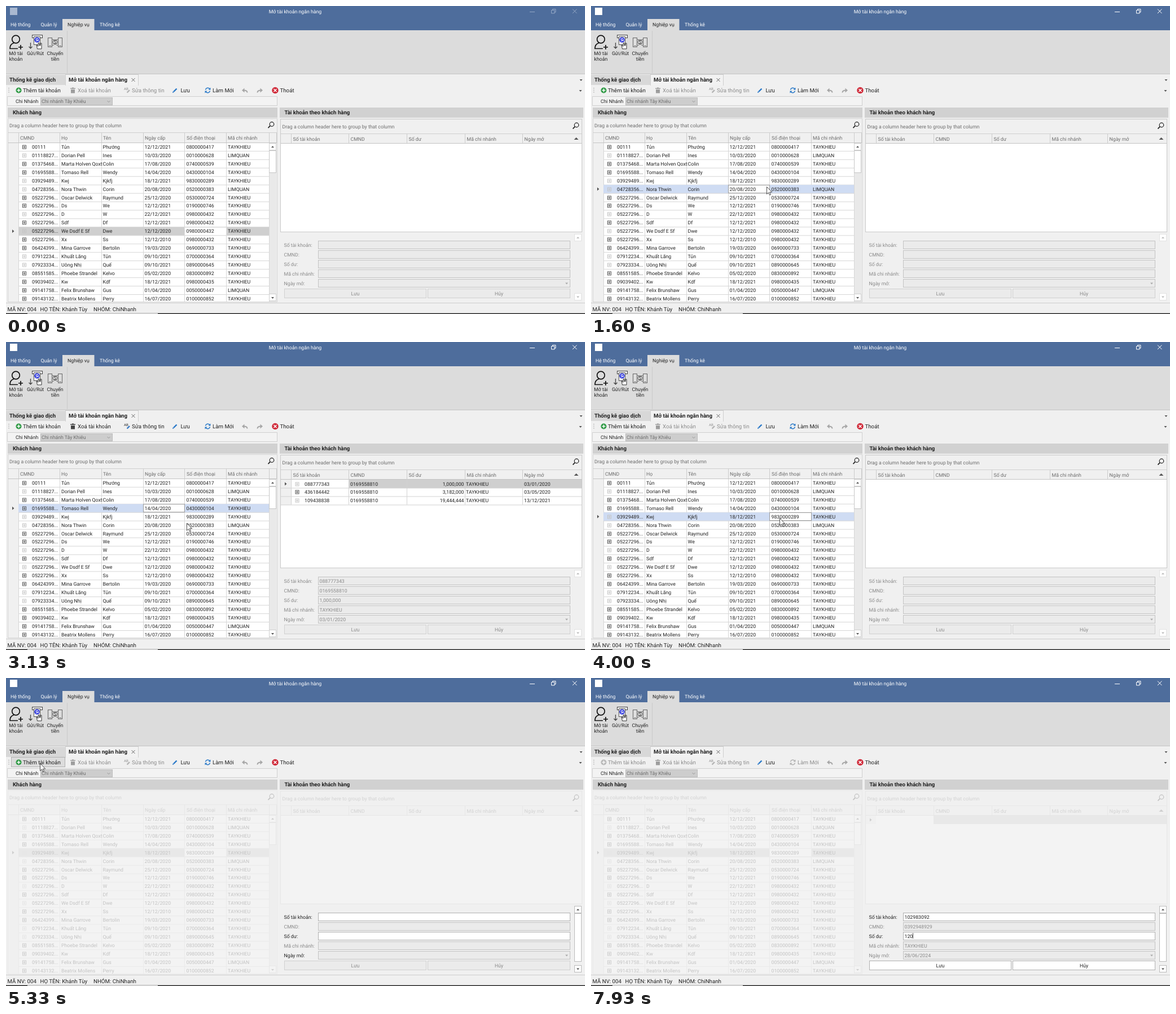
These frames come from a looping animation (1026x546 px, 8 s). An HTML page:

```html
<!DOCTYPE html>
<html lang="vi">
<head>
<meta charset="utf-8">
<title>Mở tài khoản ngân hàng</title>
<style>
html, body { margin: 0; width: 100%; height: 100%; overflow: hidden; background: #f0f0f0 }
svg { display: block; width: 1026px; height: 546px }
text { font: 8.75px Roboto, "Noto Sans", sans-serif; fill: #222; white-space: pre; text-rendering: geometricPrecision }
.big { font-size: 9.7px }
.bold { font-size: 9.65px; font-weight: bold }
.dim { fill: #6c6c6c }
.pale { fill: #8a8a8a }
.white { fill: #fff }
.mid { text-anchor: middle }
.end { text-anchor: end }
.off { opacity: .48; filter: grayscale(1) }
</style>
</head>
<body>
<svg viewBox="0 0 1026 546"><g id="scene"></g><path id="cursor" d="M.5 .5v13l3-2.7 2 4.4 2-.9-2-4.3h4.2z" fill="#fff" stroke="#222" stroke-width=".8"/></svg>
<script>
const LOOP = 8000, STEP = 66.7, ROW = 14.95;
const BRANCH = ['TAYKHIEU', 'LIMQUAN'];

// id | last name | first name | issued | phone | branch index | expandable
const customers = `00111|Tủn|Phướng|12/12/2021|0800000417|0|1
01118827...|Dorian Pell|Ines|10/03/2020|0010000628|1|0
01375468...|Marta Holven Qoxt|Colin|17/08/2020|0740000539|0|1
01695588...|Tomaso Rell|Wendy|14/04/2020|0430000104|0|1
03929489...|Kwj|Kjkfj|18/12/2021|9830000289|0|0
04728356...|Nora Thwin|Corin|20/08/2020|0520000383|1|0
05227296...|Oscar Delwick|Raymund|25/12/2020|0530000724|0|1
05227296...|Ds|We|12/12/2021|0190000746|0|1
05227296...|D|W|22/12/2021|0980000432|0|0
05227296...|Sdf|Df|12/12/2021|0980000432|0|1
05227296...|We Dsdf E Sf|Dwe|12/12/2020|0980000432|0|0
05227296...|Xx|Ss|12/12/2010|0980000432|0|1
06424399...|Mina Garrove|Bertolin|19/03/2020|0690000733|0|1
07912234...|Khuất Lãng|Tủn|09/10/2021|0700000364|0|0
07923334...|Uông Nhị|Quế|09/10/2021|0890000645|0|0
08551585...|Phoebe Strandel|Kelvo|05/02/2020|0830000892|0|1
09039402...|Kw|Kdf|18/12/2021|0980000435|0|1
09141758...|Felix Brunshaw|Gus|01/04/2020|0050000447|1|1
09143132...|Beatrix Mollens|Perry|16/07/2020|0100000852|0|1`.split('\n').map(s => s.split('|'));

const accounts = [
  ['088777343', '1,000,000', '03/01/2020'],
  ['436184442', '3,182,000', '03/05/2020'],
  ['109438838', '19,444,444', '13/12/2021']];

// start, steps, x, y
const moves = [[330, 1, 686, 494], [400, 1, 611, 480], [730, 2, 411, 399], [1070, 3, 311, 320],
  [3130, 4, 334, 322], [3470, 2, 334, 313], [3670, 2, 334, 312], [4270, 3, 122, 178], [4670, 2, 60, 151]];

const text = (x, y, s, cls = '') => `<text x="${x}" y="${y}" class="${cls}">${s}</text>`;
const box = (x, y, w, h, fill) => `<rect x="${x}" y="${y}" width="${w}" height="${h}" fill="${fill}"/>`;
const frame = (x, y, w, h, fill, line) =>
  `<rect x="${x + .5}" y="${y + .5}" width="${w - 1}" height="${h - 1}" fill="${fill}" stroke="${line}"/>`;
const path = (d, line, width = 1, fill = 'none') =>
  `<path d="${d}" stroke="${line}" stroke-width="${width}" fill="${fill}"/>`;
const disc = (x, y, r, fill, line = 'none', width = 1) =>
  `<circle cx="${x}" cy="${y}" r="${r}" fill="${fill}" stroke="${line}" stroke-width="${width}"/>`;
const fillPath = (d, fill) => path(d, 'none', 0, fill);
const vLines = (xs, y, h, c) => xs.map(x => box(x, y, 1, h, c)).join('');
const down = (x, y, c = '#555') => fillPath(`M${x - 2.5} ${y - 1}h5l-2.5 3z`, c);
const up = (x, y, c = '#555') => fillPath(`M${x - 2.5} ${y + 1.5}h5l-2.5-3z`, c);
const pointer = (x, y) => fillPath(`M${x} ${y - 3}l3.5 3-3.5 3z`, '#555');
const lens = (x, y) => disc(x + 1, y - 1, 3.8, 'none', '#222', 1.2) + path(`M${x - 1.7} ${y + 1.7}l-3.8 4`, '#222', 1.7);
const expander = (x, y, on) => {
  const c = on ? '#555' : '#c4c4c4';
  return frame(x - 3.5, Math.round(y) - 3.5, 7, 7, 'none', c) + path(`M${x - 2} ${Math.round(y)}h4m-2-2v4`, c);
};

function ribbon(active) {
  const c = active ? '#fff' : '#93a7c5';
  return box(0, 0, 1026, 43, '#4e6d9c') + box(7, 3, 13, 13, active ? '#fff' : '#a9b8d0') +
    text(512.5, 13, 'Mở tài khoản ngân hàng', 'mid white') +
    path('M928 10.5h9M966.5 7.5h5.5v5.5h-5.5zM968.5 7v-1.5h5.5v5.5h-2M1004 5.5l7.5 7.5m0-7.5l-7.5 7.5', c) +
    box(100, 23, 56.5, 20, '#dcdcdc') + box(0, 43, 1026, 78, '#dcdcdc') +
    text(8, 36, 'Hệ thống', 'white') + text(61.5, 36, 'Quản lý', 'white') +
    text(109, 36, 'Nghiệp vụ') + text(166, 36, 'Thống kê', 'white') +
    box(108, 44, 1, 75, '#cacaca') + box(0, 120, 1026, 1, '#c4c4c4') +
    disc(17.5, 59, 6.8, 'none', '#111', 1.7) +
    path('M14 65.5q-7 2-7 10h14M26 69v8m-4-4h8', '#111', 1.7) +
    frame(46, 51, 19, 6, '#eee', '#444') + frame(49, 54, 12, 15, '#fff', '#555') +
    path('M43.5 65v10m-3-3l3 3 3-3', '#444', 1.3) + disc(55, 60, 4.8, '#3a43dd') +
    path('M57 57.5q-4-.5-4 1.3t4 1.4-4 2', '#fff') +
    path('M54 69l1.5 7h7.5v-10h-2v4h-2v-4.5h-2v6z', '#333', 1, '#fff') +
    frame(74, 56, 8, 17, '#ddd', '#666') + frame(92, 56, 8, 17, '#ddd', '#666') +
    path('M76 70.5h4m14 0h4M82 59.5h3m4 0h3M82 69.5h3m4 0h3', '#777') +
    disc(87, 64, 4, '#e8e8e8', '#555') + text(87, 67, '$', 'mid') +
    text(17.5, 87, 'Mở tài', 'mid') + text(17.5, 97, 'khoản', 'mid') + text(52, 87, 'Gửi/Rút', 'mid') +
    text(87, 87, 'Chuyển', 'mid') + text(87, 97, 'tiền', 'mid');
}

function toolbar(t) {
  const open = t < 5400, edit = t >= 2530 && t < 4000;
  const tool = (on, x, label, icon) => `<g class="${on ? '' : 'off'}">${icon}${text(x, 153, label, 'big')}</g>`;
  const back = path('M427.5 153.5q0-4-6-4', '#777', 2) + fillPath('M418 149.5l4.5-4v8z', '#777');
  const hover = t >= 4730 && open ? frame(9, 140, 96, 18, t < 5000 ? '#e5e5e5' : '#dcdcdc', '#b2b2b2') : '';
  return box(0, 121, 1026, 425, '#f0f0f0') + box(0, 122, 105, 18, '#d8d8d8') +
    frame(105, 121, 130, 20, '#f2f2f2', '#cfcfcf') + box(106, 140, 128, 1, '#f0f0f0') +
    text(6, 134, 'Thống kê giao dịch', 'bold') + text(111, 134, 'Mở tài khoản ngân hàng', 'bold') +
    path('M222.5 128l6 6m0-6l-6 6', '#666') + down(1019, 131) + down(1018, 150) +
    vLines([4.5], 145, 1.3, '#888') + vLines([4.5], 148.5, 1.3, '#888') + vLines([4.5], 152, 1.3, '#888') + hover +
    tool(open, 30, 'Thêm tài khoản', disc(22.5, 149.5, 5, '#2f9a45') + path('M19.5 149.5h6m-3-3v6', '#fff', 1.6)) +
    tool(edit, 127, 'Xoá tài khoản', fillPath('M114 145.5h3v-1h3v1h3v1.5h-9zM115 148h7v6.5h-7z', '#444')) +
    tool(edit, 223, 'Sửa thông tin', `<text x="209" y="149" style="font-size:6px">AB</text>` +
      path('M214.5 153.5l4.5-4.5', '#3579c4', 2.4)) +
    tool(true, 309.5, 'Lưu', path('M297 152l5.5-5.5', '#2878c8', 2.4) + fillPath('M295 154l.7-2.8 2 2z', '#2878c8')) +
    tool(open, 366, 'Làm Mới', path('M353.5 148.5a4.2 4.2 0 0 1 7.5-1.5M361.5 150.5a4.2 4.2 0 0 1-7.5 1.5', '#2878c8', 1.5) +
      fillPath('M362.5 144.5v4h-4zM352.5 154.5v-4h4z', '#2878c8')) +
    `<g opacity=".6">${back}<g transform="matrix(-1 0 0 1 873 0)">${back}</g></g>` +
    tool(true, 485.5, 'Thoát', disc(477, 149.5, 5.7, '#d02b3a') + path('M474.5 147l5 5m0-5l-5 5', '#fff', 1.5)) +
    frame(2, 160, 479, 17, '#f3f3f3', '#d0d0d0') + text(17, 172, 'Chi Nhánh') +
    frame(61, 162, 128, 14, '#cdcdcd', '#bdbdbd') + text(63, 172, 'Chi nhánh Tây Khiêu', 'dim') +
    path('M179.5 168l2.5 2.5 2.5-2.5', '#999');
}

function selection(t) {
  if (t < 1600) return [10, 4, false];
  if (t < 2070) return [5, 3, true];
  if (t < 2530) return [4, 3, true];
  if (t < 4000) return [3, 3, true];
  return [4, 4, t < 5270];
}

function customerGrid(t) {
  const edges = [22, 95, 169, 243, 316, 390, 466], [sel, cell, focused] = selection(t);
  const heads = ['CMND', 'Họ', 'Tên', 'Ngày cấp', 'Số điện thoại', 'Mã chi nhánh'];
  const offsets = [46, 98, 171.5, 245.5, 319.5, 393];
  let s = box(3, 180, 478, 18, '#d1d1d1') + text(12, 192, 'Khách hàng', 'bold') +
    frame(3, 199, 478, 326, '#f0f0f0', '#d4d4d4') +
    text(6, 215, 'Drag a column header here to group by that column', 'dim') + lens(470, 210.5) +
    box(4, 224, 476, 1, '#cfcfcf') + box(4, 242, 476, 1, '#c4c4c4') + box(22, 243, 444, 281, '#fff') +
    vLines([...edges, 479], 225, 17, '#cbcbcb');
  heads.forEach((h, i) => s += text([25, 98, 172, 246, 320, 393][i], 237, h, 'dim'));
  let rows = '';
  customers.forEach((c, i) => {
    const y = 242.4 + i * ROW, mid = y + 7.4;
    if (i == sel) rows += box(22, y, 444, ROW, focused ? '#cfdcf3' : '#cfcfcf') + pointer(11, mid);
    rows += box(22, y + ROW - .5, 444, 1, '#d6d6d6') + expander(32.5, mid, +c[6]);
    if (i == sel) {
      const x = edges[cell], w = edges[cell + 1] - x;
      rows += frame(x, Math.round(y), w + 1, 15, '#fff', focused ? '#999' : '#e0e0e0');
    }
    offsets.forEach((x, k) => rows += text(x, (mid + 3).toFixed(1), k == 5 ? BRANCH[c[5]] : c[k]));
  });
  return s + `<svg width="481" height="524">${vLines(edges, 243, 281, '#d6d6d6')}${rows}</svg>` +
    box(467, 243, 12, 281, '#e9e9e9') + frame(466, 243, 13, 13, '#fff', '#cfcfcf') + up(472.5, 249.5) +
    frame(466, 256, 13, 40, '#fff', '#c6c6c6') + frame(466, 510, 13, 13, '#fff', '#cfcfcf') + down(472.5, 517) +
    (t >= 5270 ? `<g opacity=".78">${box(3, 199, 478, 326, '#f0f0f0')}</g>` : '');
}

function accountGrid(t) {
  const edges = [505, 607, 710, 813, 915], full = t >= 2470 && t < 4000;
  let s = box(485, 180, 538, 18, '#d1d1d1') + text(493.5, 192, 'Tài khoản theo khách hàng', 'bold') +
    frame(486, 200, 535, 201, '#f0f0f0', '#c9c9c9') +
    text(489.5, 216.5, 'Drag a column header here to group by that column', 'dim') + lens(1010, 212) +
    box(487, 226, 533, 1, '#cfcfcf') + box(487, 244, 533, 156, '#fff') + box(487, 243, 533, 1, '#c4c4c4') +
    vLines(edges, 227, 16, '#cbcbcb') + fillPath('M1006.5 237h8l-4-4z', '#555');
  ['Số tài khoản', 'CMND', 'Số dư', 'Mã chi nhánh', 'Ngày mở'].forEach((h, i) =>
    s += text(edges[i] + 3.5, 238.5, h, 'dim'));
  if (full || t >= 5400)
    s += box(487, 244, 18, full ? 45 : 15, '#f0f0f0') + box(607, 244, 413, 15, '#cfcfcf') + pointer(494, 251.5);
  if (full) accounts.forEach(([id, sum, date], i) => {
    const y = 254.5 + i * ROW;
    s += box(487, y + 4, 533, 1, '#d2d2d2') + expander(516, y - 3, i == 1) + text(529, y, id) +
      text(610, y, '0169558810') + text(811.5, y, sum, 'end') + text(815, y, BRANCH[0]) + text(918, y, date) +
      vLines(edges, y - 11, 15, '#d2d2d2');
  });
  return s + (t >= 5330 ? `<g opacity=".78">${box(485, 199, 538, 202, '#f0f0f0')}</g>` : '');
}

function form(t) {
  const editing = t >= 5330, ready = t >= 5400, full = t >= 2530 && t < 4000;
  const typed = '102983092'.slice(0, Math.max(0, 1 + Math.floor((t - 5670) / 50)));
  const sum = '120'.slice(0, t < 7530 ? 0 : t < 7730 ? 1 : t < 7930 ? 2 : 3);
  let values = ['', '', '', '', ''];
  if (t >= 2470 && t < 4000) values = ['088777343', '', '', '', '03/01/2020'];
  if (full) values = ['088777343', '0169558810', '1,000,000', BRANCH[0], '03/01/2020'];
  if (ready) values = [typed, '0392948929', sum, BRANCH[0], '28/06/2024'];
  let s = '';
  ['Số tài khoản:', 'CMND:', 'Số dư:', 'Mã chi nhánh:', 'Ngày mở:'].forEach((label, i) => {
    const y = Math.round(415.7 + 17.05 * i), on = editing && (i == 0 || i == 2);
    s += text(492.5, y + 11, label, on || i == 4 && editing && !ready ? '' : 'pale') +
      frame(553, y, 447, 15, on ? '#fff' : '#ebebeb', on ? '#b0b0b0' : '#c3c3c3') +
      text(555.5, y + 10.5, values[i], on ? '' : 'pale');
  });
  if (t >= 5670 && t < 6600) s += box(555.5 + typed.length * 4.91, 418, .8, 10, '#222');
  if (t >= 6670 && t < 7200 || t >= 7530) s += box(555.3 + sum.length * 4.95, 452, .8, 10, '#222');
  s += down(993.5, 491.5, '#aaa');
  [['Lưu', 493, 252], ['Hủy', 747, 253]].forEach(([label, x, w]) =>
    s += frame(x, 501, w, 17, ready ? '#fff' : '#ebebeb', ready ? '#b0b0b0' : '#d0d0d0') +
      text(x + w / 2, 513, label, ready ? 'mid' : 'mid pale'));
  const line = editing ? '#bbb' : '#e2e2e2', arrow = editing ? '#555' : '#bbb';
  if (editing) s += frame(1007, 417, 13, 86, '#fff', line);
  return s + frame(1007, 404, 13, 13, '#fff', line) + up(1013.5, 410.5, arrow) +
    frame(1007, 509, 13, 13, '#fff', line) + down(1013.5, 515.5, arrow);
}

const footer = box(0, 526, 1026, 1, '#cdcdcd') + text(2.5, 541, 'MÃ NV: 004', 'big') +
  text(60.5, 541, 'HỌ TÊN: Khánh Tùy', 'big') + text(155, 541, 'NHÓM: ChiNhanh', 'big') +
  box(0, 544.6, 1026, 1.4, '#1c1c1c') + box(38, 544.6, 231, 1.4, '#e4e4e4');

function cursorAt(t) {
  if (t < 330 || t >= 5670) return null;
  let x = 686, y = 494;
  for (const [start, steps, tx, ty] of moves) {
    if (t < start) break;
    const k = Math.min(1, (Math.floor((t - start + 4) / STEP) + 1) / steps), e = 1 - (1 - k) ** 1.7;
    x += (tx - x) * e;
    y += (ty - y) * e;
  }
  return [x, y];
}

const scene = document.getElementById('scene'), cursor = document.getElementById('cursor');
let shown = '';
function draw(now) {
  const t = now % LOOP, pos = cursorAt(t);
  const next = ribbon(t >= 1600) + toolbar(t) + customerGrid(t) + accountGrid(t) + form(t) + footer;
  if (next != shown) scene.innerHTML = shown = next;
  cursor.setAttribute('visibility', pos ? 'visible' : 'hidden');
  if (pos) cursor.setAttribute('transform', `translate(${pos})`);
}
const begin = performance.now();
function tick() {
  draw(performance.now() - begin);
  requestAnimationFrame(tick);
}
tick();
</script>
</body>
</html>
```
